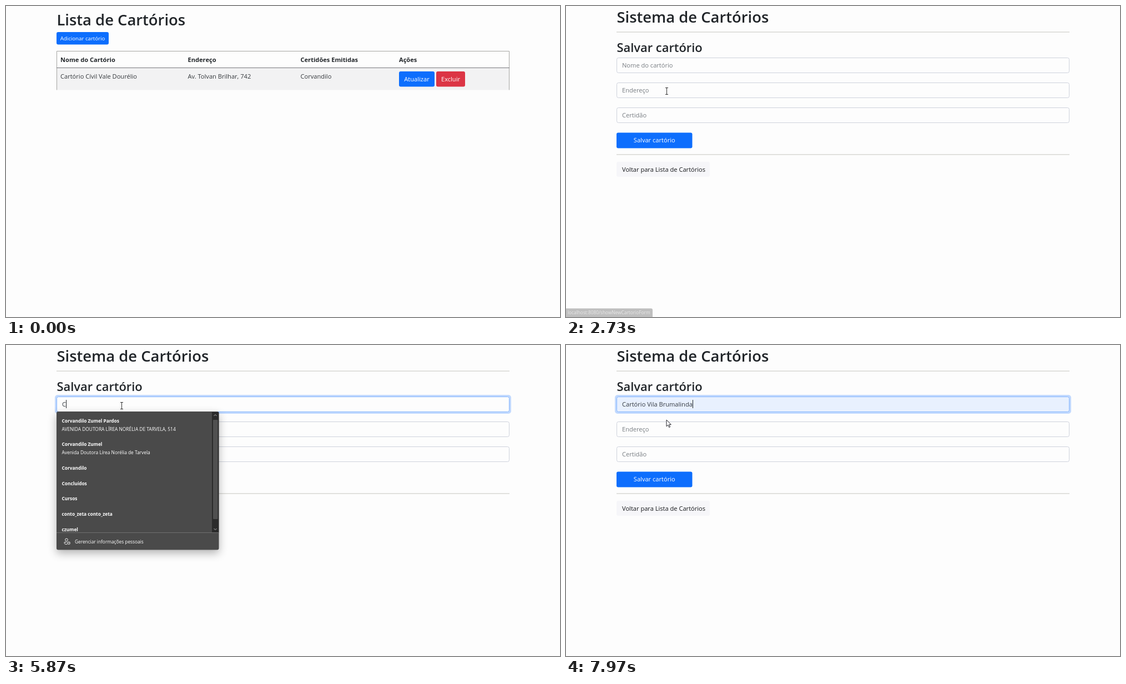
Write an HTML page with a canvas that moves like this. It is 998 px wide and 561 px high and loops after 8000 ms.

```html
<!DOCTYPE html>
<html lang="pt-BR">
<head>
<meta charset="utf-8">
<title>Lista de Cartórios</title>
<style>
html, body { margin: 0; width: 100%; height: 100%; overflow: hidden; background: #fdfdfd; }
canvas { display: block; width: 998px; height: 561px; }
</style>
</head>
<body>
<canvas id="stage" width="998" height="561"></canvas>
<script>
const ctx = document.getElementById('stage').getContext('2d');
const LOOP = 8000;
const INK = '#212529', BLUE = '#0d6efd', BLUE_HOVER = '#0b5ed7', RED = '#dc3545', PANEL = '#4a4a4a';
const PANEL_TOP = 120;

// Moments of the session, in ms
const AT = {
  enter: 170, hover: 1830, status: 1900, open: 2480, focus: 3150,
  c: 4700, a: 6000, r: 6180, t: 6300, preview: 7470, pick: 7600
};

const POINTER_PATH = [
  [170, 890, 540], [600, 870, 500], [1000, 823, 513], [1100, 410, 390],
  [1400, 230, 190], [1800, 140, 67], [2350, 142, 60], [2500, 150, 75],
  [2730, 181, 153], [3100, 197, 113], [3730, 197, 113], [5870, 208, 109],
  [7000, 208, 109], [7400, 180, 123], [7500, 181, 135]
];

const CHOSEN = 'Cartório Vila Brumalinda';
const PERSON = 'Corvandilo Zumel';
const PROFILES = [
  [PERSON + ' Pardos', 'AVENIDA DOUTORA LÍREA NORÉLIA DE TARVELA, 514'],
  [PERSON, 'Avenida Doutora Lírea Norélia de Tarvela'],
  ['Corvandilo']
];
const ALL_ENTRIES = [...PROFILES, ['Base 2038 Integral'], ['Vale Dourélio'],
  ['Web Total Guia Integral do Iniciante ao Superior'], ['Concluídos']];
const C_ENTRIES = [...PROFILES, ['Concluídos'], ['Cursos'], ['conto_zeta conto_zeta'], ['czumel']];
const OFFICES = [CHOSEN, 'Cartório de Registro Civil de Tarumirela',
  'Cartório Tarumirela', 'Cartório de Vale Nerindo'];
const CA_ENTRIES = [...OFFICES, 'Cadastro geral', 'Cadastro'];

function text(str, x, y, size = 11.1, color = INK, weight = 400, align = 'left') {
  ctx.font = `${weight} ${size}px "Open Sans", "Noto Sans", sans-serif`;
  ctx.fillStyle = color;
  ctx.textAlign = align;
  ctx.fillText(str, x, y);
}

function rect(x, y, w, h, color) {
  ctx.fillStyle = color;
  ctx.fillRect(x, y, w, h);
}

function box(x, y, w, h, r, fill, stroke) {
  ctx.beginPath();
  ctx.roundRect(x, y, w, h, r);
  if (fill) { ctx.fillStyle = fill; ctx.fill(); }
  if (stroke) { ctx.strokeStyle = stroke; ctx.lineWidth = 1; ctx.stroke(); }
}

function lines(color, width, ...paths) {
  ctx.strokeStyle = color;
  ctx.lineWidth = width;
  ctx.beginPath();
  for (const [start, ...rest] of paths) {
    ctx.moveTo(...start);
    rest.forEach(p => ctx.lineTo(...p));
  }
  ctx.stroke();
}

function button(label, x, y, w, h, fill, size = 11.1) {
  box(x, y, w, h, 3, fill);
  text(label, x + w / 2, y + h / 2 + size * 0.36, size, '#fff', 400, 'center');
}

function listPage(t) {
  text('Lista de Cartórios', 91.5, 35, 27.4, INK, 600);
  button('Adicionar cartório', 91, 47, 94, 22.5, t >= AT.hover ? BLUE_HOVER : BLUE, 9.7);
  rect(92, 112, 814, 39.5, '#f2f2f3');
  lines('#a5a5a2', 1, [[91.5, 151.5], [91.5, 81.5], [906.5, 81.5], [906.5, 151.5]]);
  lines('#77777c', 1, [[91, 111.5], [907, 111.5]]);
  const columns = [
    [98, 'Nome do Cartório', 'Cartório Cívil Vale Dourélio'],
    [327.5, 'Endereço', 'Av. Tolvan Brilhar, 742'],
    [530.5, 'Certidões Emitidas', 'Corvandilo'],
    [708, 'Ações', '']
  ];
  for (const [x, head, cell] of columns) {
    text(head, x, 101, 11.1, INK, 700);
    text(cell, x, 131, 11.1, '#35393d');
  }
  button('Atualizar', 708, 118, 64, 27.5, BLUE);
  button('Excluir', 775, 118, 52, 27.5, RED);
}

function nameValue(t) {
  if (t >= AT.preview) return CHOSEN;
  return ['c', 'a', 'r', 't'].map((key, i) => t >= AT[key] ? 'Cart'[i] : '').join('');
}

function caretVisible(t) {
  const keys = [AT.focus, AT.c, AT.a, AT.r, AT.t, AT.pick];
  const last = Math.max(...keys.filter(k => k <= t));
  return (t - last) % 1060 < 530;
}

function field(y, placeholder, value = '', fill = '#fdfdfd', focus = 0) {
  if (focus) box(88, y - 3, 822, 34, 5, `rgba(13,110,253,${0.25 * focus})`);
  box(91.5, y + 0.5, 815, 27, 3, fill, focus ? '#86b7fe' : '#ced2dc');
  text(value || placeholder, 101, y + 18, 11.1, value ? '#343a40' : '#787d82');
}

function formPage(t) {
  text('Sistema de Cartórios', 91.5, 29.5, 27.4, INK, 600);
  rect(91, 46.5, 816, 1, '#c6c6bf');
  text('Salvar cartório', 91.5, 82.5, 21.9, INK, 600);
  const value = nameValue(t);
  const focus = Math.min(1, Math.max(0, (t - AT.focus) / 150));
  field(93, 'Nome do cartório', value, t >= AT.preview ? '#e8f0fe' : '#fdfdfd', focus);
  if (t >= AT.focus && caretVisible(t)) {
    rect(Math.round(101 + ctx.measureText(value).width), 99, 1, 15, INK);
  }
  field(138, 'Endereço');
  field(183, 'Certidão');
  button('Salvar cartório', 91, 228.5, 136.5, 28, BLUE, 11.1);
  rect(91, 267.5, 816, 1, '#c6c6bf');
  box(91, 281, 168, 27, 3, '#f6f6f9');
  text('Voltar para Lista de Cartórios', 101, 299, 11.1, '#16181b');
  dropdown(t);
}

function panel(bottom) {
  ctx.save();
  ctx.shadowColor = 'rgba(0,0,0,.3)';
  ctx.shadowBlur = 16;
  ctx.shadowOffsetY = 6;
  box(91, PANEL_TOP, 292.5, bottom - PANEL_TOP, 3, PANEL);
  ctx.restore();
}

function personIcon() {
  ctx.strokeStyle = '#f2f2f2';
  ctx.lineWidth = 1;
  ctx.beginPath();
  ctx.arc(109, 351.5, 2.4, 0, 7);
  ctx.moveTo(110, 359.5);
  ctx.quadraticCurveTo(104.5, 360, 105, 355.8);
  ctx.lineTo(109, 355.8);
  ctx.rect(111, 355.5, 4, 3.5);
  ctx.stroke();
}

function profileList(entries, thumbEnd) {
  panel(369.5);
  ctx.save();
  ctx.beginPath();
  ctx.rect(91, PANEL_TOP, 292.5, 338 - PANEL_TOP);
  ctx.clip();
  let y = 140;
  for (const [title, detail] of entries) {
    text(title, 100.5, y, 8.3, '#fff', 700);
    if (detail) text(detail, 100.5, y + 14.5, 8.4, '#fff');
    y += detail ? 42.4 : 27.7;
  }
  rect(371, 121, 12.5, 217, '#2b2b2b');
  box(373, 135, 8.5, thumbEnd - 135, 1, '#505050');
  lines('#b5b5b5', 1, [[374.5, 128], [377, 125.5], [379.5, 128]], [[374.5, 331], [377, 333.5], [379.5, 331]]);
  ctx.restore();
  rect(91, 338, 292.5, 1, '#707070');
  personIcon();
  text('Gerenciar informações pessoais', 124, 358, 8.3, '#fff');
}

function officeList(entries, hovered) {
  panel(125.5 + entries.length * 25);
  if (hovered) rect(91, 124, 292.5, 25, '#626262');
  entries.forEach((name, i) => text(name, 100.5, 139.3 + i * 25, 8.4, '#fff'));
}

function dropdown(t) {
  if (t < AT.focus || t >= AT.pick) return;
  if (t < AT.c) profileList(ALL_ENTRIES, 265);
  else if (t < AT.a) profileList(C_ENTRIES, 314);
  else officeList(t < AT.r ? CA_ENTRIES : OFFICES, t >= AT.preview);
}

function statusBar(t) {
  const alpha = Math.min(1, (2800 - t) / 200);
  if (t < AT.status || alpha <= 0) return;
  ctx.globalAlpha = alpha;
  box(-3, 545.5, 159, 19, 3, PANEL);
  ctx.globalAlpha = Math.max(alpha, 0.8);
  text('localhost:8080/showNewCartorioForm', 3, 556, 8.3, '#f4f4f4');
  ctx.globalAlpha = 1;
}

function pointerAt(t) {
  const next = POINTER_PATH.findIndex(p => p[0] > t);
  if (next < 0) return POINTER_PATH.at(-1).slice(1);
  const [t0, x0, y0] = POINTER_PATH[next - 1], [t1, x1, y1] = POINTER_PATH[next];
  const k = (t - t0) / (t1 - t0);
  return [x0 + (x1 - x0) * k, y0 + (y1 - y0) * k];
}

const ARROW = new Path2D('M0 0V11.8L2.8 9.2L4.7 13.6L6.6 12.8L4.7 8.6H8.3Z');
const HAND = new Path2D('M0 1Q1 -1 2 1V5L7 6Q8.5 6 8 9L7 13H1L-3 8Q-3 6 0 8Z');

function pointer(t) {
  if (t < AT.enter) return;
  const [x, y] = pointerAt(t);
  const onForm = t >= AT.open;
  const listOpen = t >= AT.focus && t < AT.pick;
  const onField = onForm && [93, 138, 183].some((top, i) => y >= top && y <= top + 28 && !(i && listOpen));
  ctx.save();
  ctx.translate(Math.round(x), Math.round(y));
  if (onField) {
    lines('#333', 1, [[0.5, -5], [0.5, 6]], [[-2, -5.5], [3, -5.5]], [[-2, 6.5], [3, 6.5]]);
  } else {
    const shape = !onForm && t >= AT.hover ? HAND : ARROW;
    ctx.fillStyle = '#fff';
    ctx.strokeStyle = '#23232b';
    ctx.lineWidth = 1;
    ctx.fill(shape);
    ctx.stroke(shape);
  }
  ctx.restore();
}

function draw(now) {
  const t = now % LOOP;
  rect(0, 0, 998, 561, '#fdfdfd');
  if (t < AT.open) listPage(t);
  else formPage(t);
  statusBar(t);
  pointer(t);
  requestAnimationFrame(draw);
}
requestAnimationFrame(draw);
</script>
</body>
</html>
```
